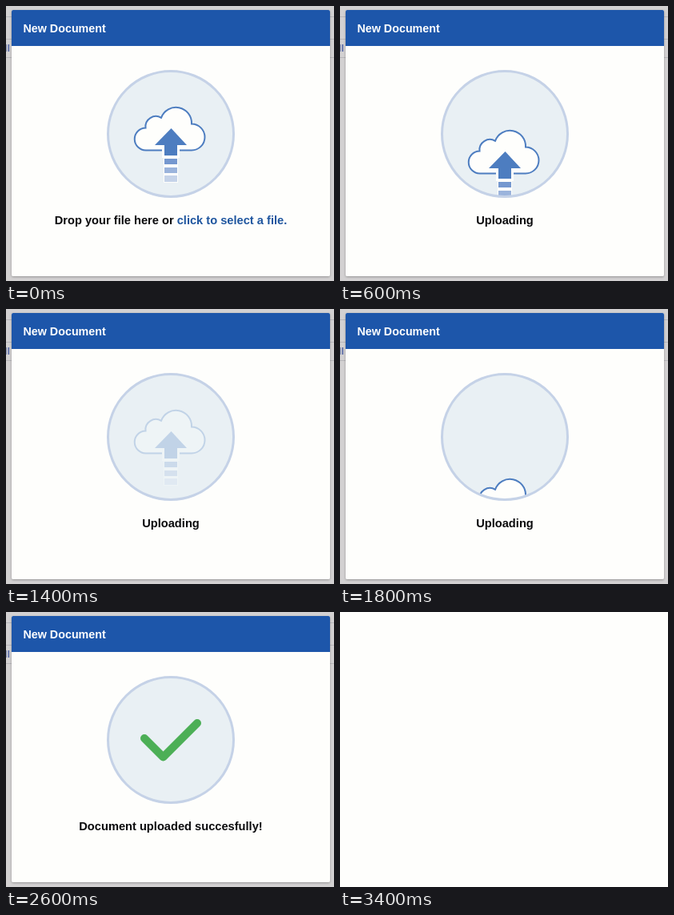
An HTML page that plays this animation: 410 px wide and 344 px high, repeating every 3.6 s.

```html
<!DOCTYPE html>
<html lang="en">
<head>
<meta charset="utf-8">
<title>Upload dialog</title>
<style>
  html, body { margin: 0; width: 100%; height: 100%; overflow: hidden; background: #fefefc; }
  svg { display: block; width: 410px; height: 344px; }
  text { font: bold 14.65px "Liberation Sans", Arial, sans-serif; }
  .page line { stroke: #b7b6ba; }
  #message { text-anchor: middle; fill: #0b0b0d; }
  #message .link { fill: #1f569f; }
</style>
</head>
<body>
<svg viewBox="0 0 410 344">
  <defs>
    <clipPath id="disc"><circle cx="206" cy="160" r="77.5"/></clipPath>
    <filter id="shadow" x="-5%" y="-5%" width="110%" height="110%">
      <feDropShadow dx="0" dy="1" stdDeviation="1.5" flood-opacity=".3"/>
    </filter>
  </defs>
  <g id="scene">
    <g class="page">
      <rect width="410" height="344" fill="#d3d1d2"/>
      <line x2="410" y1="13.5" y2="13.5"/>
      <line x2="410" y1="41.5" y2="41.5"/>
      <line x2="410" y1="64.5" y2="64.5"/>
      <text x="-2" y="57" style="font-size:13px" fill="#5b6ca6">ll</text>
    </g>
    <rect x="7" y="5" width="398" height="333" rx="2" fill="#fefefc" filter="url(#shadow)"/>
    <path d="M7 50V7a2 2 0 0 1 2-2H403a2 2 0 0 1 2 2V50Z" fill="#1d56aa"/>
    <text x="21.5" y="33" style="font-size:14.3px" fill="#fff">New Document</text>

    <g clip-path="url(#disc)">
      <g id="content">
        <circle cx="206" cy="160" r="79" fill="#e9f0f4"/>
        <g id="cloud">
          <path d="M175 180.5A14 14 0 0 1 174.5 152.5A13 13 0 0 1 194 139.8A19.6 19.6 0 0 1 232 147.5A16.5 16.5 0 0 1 232 180.5Z"
                fill="#fefefc" stroke="#4d7dc0" stroke-width="2"/>
          <path d="M195 179H217V190H215V221H197V190H195Z" fill="#fefefc"/>
          <path d="M206.5 153L226 174H214V187H198V174H186Z" fill="#4d7dc0"/>
          <rect x="198" y="191" width="16" height="7" fill="#7598cf"/>
          <rect x="198" y="202" width="16" height="7" fill="#9bb4dc"/>
          <rect x="198" y="212" width="16" height="8" fill="#c5d3e9"/>
        </g>
        <path id="check" d="M173 158L196.5 181.5L239 139" fill="none" stroke="#4caf56"
              stroke-width="10" stroke-linecap="round" stroke-linejoin="round"/>
      </g>
    </g>
    <circle cx="206" cy="160" r="78.5" fill="none" stroke="#c5d2e7" stroke-width="3"/>
    <text id="message" x="206" y="273"></text>
  </g>
</svg>
<script>
const LOOP = 3600;
const messages = {
  drop: 'Drop your file here or <tspan class="link">click to select a file.</tspan>',
  busy: 'Uploading',
  done: 'Document uploaded succesfully!'
};

// Each pose holds until the next one starts.
const poses = [
  { at: 0, text: 'drop' },
  { at: 200, text: 'busy', cloud: 0 },
  { at: 400, text: 'busy', shift: 86 },
  { at: 600, text: 'busy', shift: 29 },
  { at: 800, text: 'busy' },
  { at: 1400, text: 'busy', cloud: 0.25 },
  { at: 1600, text: 'busy', cloud: 0 },
  { at: 1800, text: 'busy', shift: 86 },
  { at: 2000, text: 'done', shift: 29 },
  { at: 2200, text: 'done', shift: -34 },
  { at: 2400, text: 'done', shift: -94 },
  { at: 2600, text: 'done', cloud: 0, check: 1 },
  { at: 3000, text: 'done', cloud: 0, check: 1, content: 0.8 },
  { at: 3200, text: 'done', cloud: 0, check: 1, content: 0.6 },
  { at: 3400, text: 'done', scene: 0 }
];

const $ = id => document.getElementById(id);
let current;

function show({ text, shift = 0, cloud = 1, check = 0, content = 1, scene = 1 }) {
  $('message').innerHTML = messages[text];
  $('cloud').setAttribute('transform', `translate(0 ${shift})`);
  for (const [id, opacity] of Object.entries({ cloud, check, content, scene }))
    $(id).setAttribute('opacity', opacity);
}

function tick() {
  const time = performance.now() % LOOP;
  const pose = poses.findLast(p => p.at <= time);
  if (pose !== current) show(current = pose);
  requestAnimationFrame(tick);
}
tick();
</script>
</body>
</html>
```
